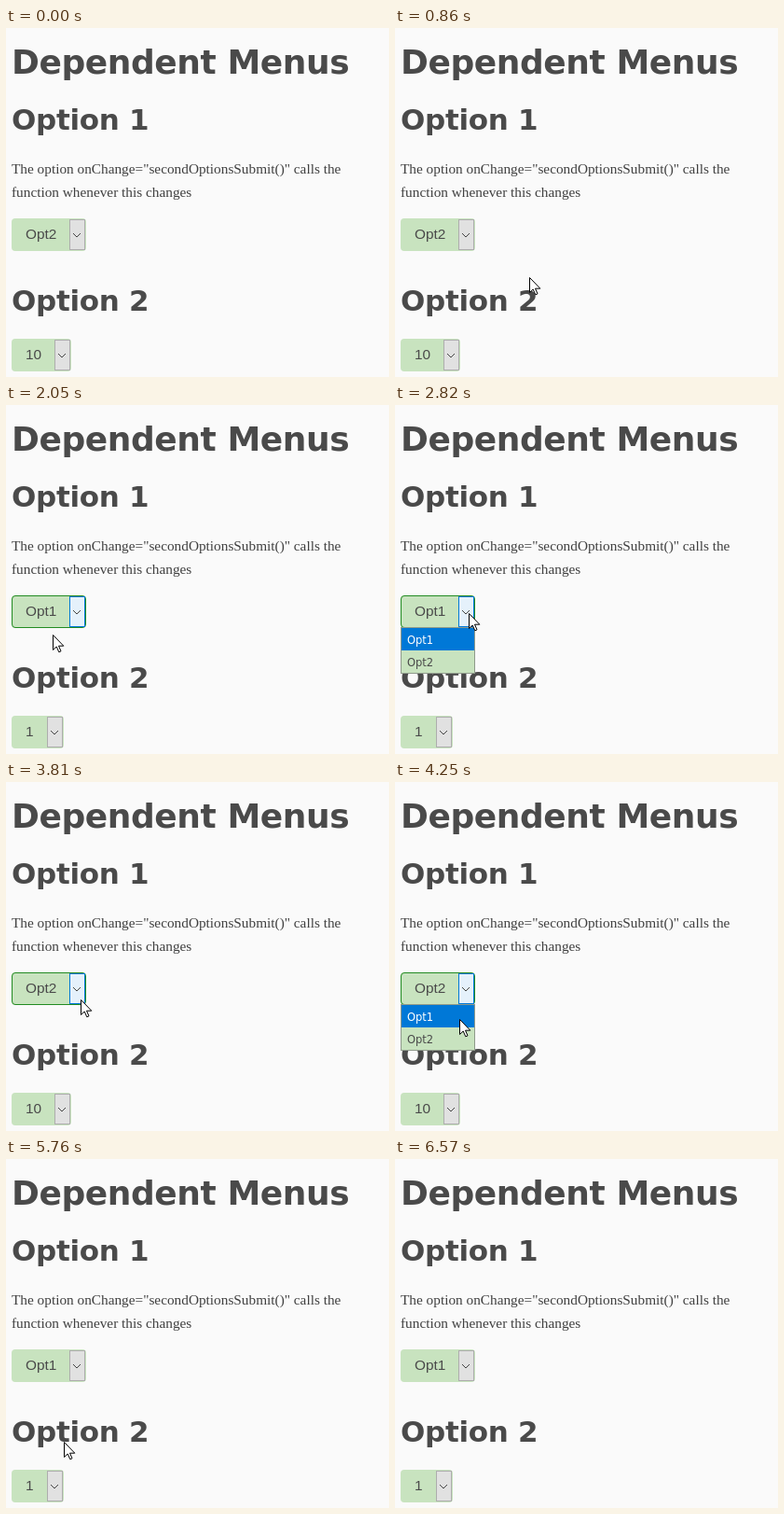
An HTML page for the animation above (7760 ms loop, 411 by 374 pixels).

```html
<!DOCTYPE html>
<html lang="en">
<head>
<meta charset="utf-8">
<title>Dependent Menus</title>
<style>
  html, body { margin: 0; width: 100%; height: 100%; overflow: hidden; background: #fafafa; }
  svg { display: block; width: 411px; height: 374px; }
  text { fill: #4a4a4a; white-space: pre; }
  .h1, .h2 { font: bold 36px "DejaVu Sans", sans-serif; letter-spacing: -.42px; }
  .h2 { font-size: 31px; letter-spacing: -.32px; }
  .p { font: 15.3px "Liberation Serif", serif; fill: #404040; }
  .value { font: 15.4px "Liberation Sans", sans-serif; }
  .item { font: 11.5px "DejaVu Sans", sans-serif; }
</style>
</head>
<body>
<svg viewBox="0 0 411 374">
  <text class="h1" x="6" y="49">Dependent Menus</text>
  <text class="h2" x="6" y="109">Option 1</text>
  <text class="p" x="6" y="156">The option onChange="secondOptionsSubmit()" calls the</text>
  <text class="p" x="6" y="181">function whenever this changes</text>
  <text class="h2" x="6" y="303">Option 2</text>
  <g id="ui"></g>
  <path id="cursor" d="M.5 .5V16.5L4.2 13L6.8 18.8L9 17.8L6.5 12.2H11.8Z" fill="#fff" stroke="#000"/>
</svg>
<script>
const LOOP = 7760, TICK = 108, ROW = 24, LIST_TOP = 239;
const GREEN = '#c8e3bf', BLUE = '#0078d7';
const ENTER = 530, BLUR = 5340, LEAVE = 6570;
const ui = document.getElementById('ui'), cursor = document.getElementById('cursor');

// Each click opens the list or picks the other option
const clicks = [1390, 2050, 2820, 3480, 4030, 4900];

// Pointer strokes: start time, steps, end point
const strokes = [
  [ENTER, 8, 72, 222],
  [1600, 2, 50, 246],
  [2270, 3, 79, 223],
  [2930, 4, 66, 272],
  [3590, 3, 80, 233],
  [4140, 2, 69, 254],
  [4370, 2, 67, 267],
  [4590, 2, 68, 251],
  [5010, 2, 89, 262],
  [5450, 10, 36, 342]
];

function pointer(t) {
  let x = 359, y = 402;
  for (const [start, steps, endX, endY] of strokes) {
    if (t < start) break;
    const f = Math.min(1, (Math.floor((t - start) / TICK) + 1) / steps);
    const eased = 1 - (1 - f) ** 2;
    x += (endX - x) * eased;
    y += (endY - y) * eased;
  }
  return [Math.round(x), Math.round(y)];
}

const rect = (x, y, w, h, fill, more = '') =>
  `<rect x="${x}" y="${y}" width="${w}" height="${h}" fill="${fill}" ${more}/>`;

function select(y, w, label, focus) {
  const bx = w - 12;
  return rect(6, y, w, 35, GREEN, 'rx="4"') +
    (focus ? rect(6.5, y + .5, w - 1, 34, 'none', 'rx="3.5" stroke="#228b22"') : '') +
    rect(bx + .5, y + 1.5, 16, 32, focus ? '#e5f1fb' : '#e1e1e1',
      `stroke="${focus ? BLUE : '#adadad'}"`) +
    `<path d="M${bx + 4} ${y + 16}l4 4l4 -4" fill="none" stroke="#444"/>
    <text class="value" x="21" y="${y + 22}">${label}</text>`;
}

function list(active) {
  return rect(6.5, LIST_TOP - .5, 79, 2 * ROW + 1, GREEN, 'stroke="#8f9a8b"') +
    [0, 1].map(i => {
      const top = LIST_TOP + ROW * i, on = i === active;
      return (on ? rect(7, top, 78, ROW, BLUE) : '') +
        `<text class="item" x="13" y="${top + 17}" ${on ? 'style="fill:#fff"' : ''}>Opt${i + 1}</text>`;
    }).join('');
}

let last = '';
function draw(t) {
  const [x, y] = pointer(t);
  const count = clicks.filter(c => t >= c).length;
  const open = count % 2 === 1;
  const chosen = (1 + Math.floor(count / 2)) % 2;
  const active = y < LIST_TOP ? chosen : y < LIST_TOP + ROW ? 0 : 1;

  const html = select(204, 80, 'Opt' + (chosen + 1), count > 0 && t < BLUR) +
    select(333, chosen ? 64 : 56, chosen ? '10' : '1', false) +
    (open ? list(active) : '');
  if (html !== last) ui.innerHTML = last = html;

  cursor.setAttribute('transform', `translate(${x} ${y})`);
  cursor.setAttribute('visibility', t >= ENTER && t < LEAVE ? 'visible' : 'hidden');
}

const origin = performance.now();
function tick() {
  draw((performance.now() - origin) % LOOP);
  requestAnimationFrame(tick);
}
tick();
</script>
</body>
</html>
```
